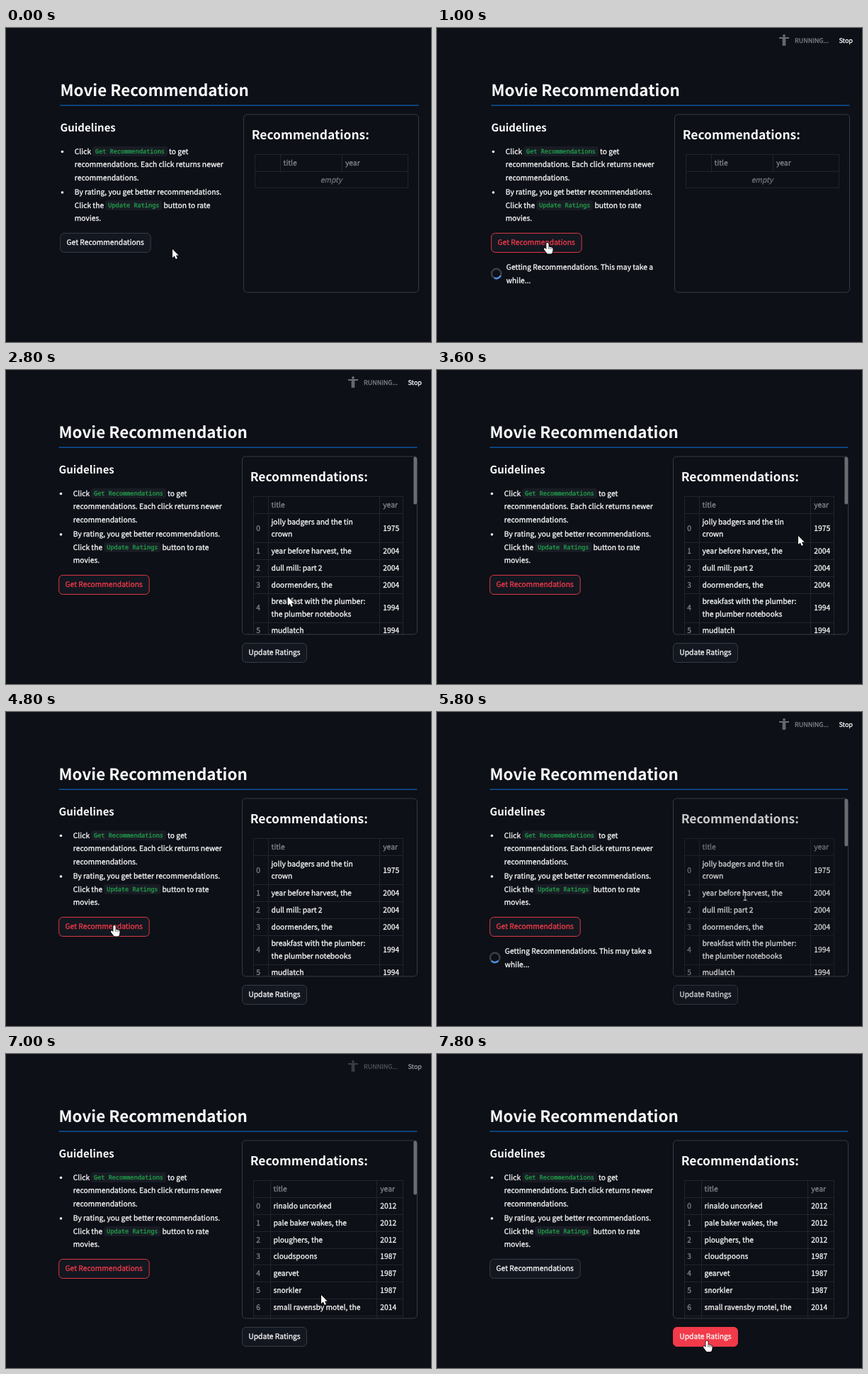
An HTML page with a canvas that plays this animation: 600 by 443 pixels, repeating every 8 s.

```html
<!DOCTYPE html>
<html lang="en">
<head>
<meta charset="utf-8">
<title>Movie Recommendation</title>
<style>
html, body { margin: 0; width: 100%; height: 100%; overflow: hidden; background: #0d1017; }
canvas { display: block; width: 600px; height: 443px; }
</style>
</head>
<body>
<canvas id="stage"></canvas>
<script>
const W = 600, H = 443, LOOP = 8000, STEP = 200;
const SANS = '"Noto Sans CJK JP", "Noto Sans CJK SC", "Noto Sans CJK", "Noto Sans", sans-serif';
const MONO = '"Noto Sans Mono", "DejaVu Sans Mono", monospace';
const BG = '#0d1017', WHITE = '#fafafa', GREY = '#85878d', RED = '#f23a4a';
const EDGE = '#3d4046', RULE = '#21242b', GREEN = '#21a34c', BODY = 10.3;

const canvas = document.getElementById('stage');
const ctx = canvas.getContext('2d');
const dpr = window.devicePixelRatio || 1;
canvas.width = W * dpr;
canvas.height = H * dpr;

// Each run: button press, start of the dimming, status shown, results in, spinner pose.
const runs = [
  { press: 600, dim: 650, on: 1000, done: 2800, spinAt: 2000, spinFrom: 190 },
  { press: 5000, dim: 4800, on: 5200, done: 6800, spinAt: 5800, spinFrom: 90 }
];
const UPDATE_PRESS = 7800;

const pointerPath = [
  [0, 235, 312], [200, 235, 312], [600, 156, 303], [1000, 156, 303], [1800, 398, 320],
  [2800, 398, 320], [3600, 510, 234], [3800, 510, 234], [4600, 158, 302], [4800, 153, 301],
  [5000, 153, 301], [5800, 435, 260], [6200, 435, 260], [7000, 445, 340],
  [7200, 445, 340], [7600, 381, 404.5], [8000, 381, 404.5]
];

const lists = [
  {
    cols: [349, 370, 527, 560],
    thumb: 67,
    rows: [
      [['jolly badgers and the tin', 'crown'], '1975'],
      [['year before harvest, the'], '2004'],
      [['dull mill: part 2'], '2004'],
      [['doormenders, the'], '2004'],
      [['breakfast with the plumber:', 'the plumber notebooks'], '1994'],
      [['mudlatch'], '1994']
    ]
  },
  {
    cols: [349, 373, 523, 560],
    thumb: 76,
    rows: [
      [['rinaldo uncorked'], '2012'],
      [['pale baker wakes, the'], '2012'],
      [['ploughers, the'], '2012'],
      [['cloudspoons'], '1987'],
      [['gearvet'], '1987'],
      [['snorkler'], '1987'],
      [['small ravensby motel, the'], '2014'],
      [[''], '']
    ]
  }
];

const arrow = new Path2D('M0 0V12.2L2.8 9.6L4.8 14L6.9 13L5 8.8H8.7Z');
const hand = new Path2D('M-1.6 1.2Q0 -1.4 1.6 1.2V5.6L6 6.6Q8 7.2 7.7 9.2L7 13.2Q6.6 15.6 4.8 15.6' +
  'H1Q-.6 15.6 -1.5 14L-5 9.2Q-5.4 7.2 -3.5 7.6L-1.6 9.2Z');
const fingers = new Path2D('M1.7 5.6V9M3.9 6.3V9.2M6 6.8V9.4');
const beam = new Path2D('M-2.5 -5.5H2.5M0 -5.5V5.5M-2.5 5.5H2.5');
const poses = [
  'M-1 -2L-2 3L2 5L1 9M-2 3L-5 8M-1 -2L4 0M-1 -2L-5 1',
  'M1 -2L-1 3L3 5L4 9M-1 3L-3 5L-6 8M1 -2L5 2M1 -2L-4 -1L-6 2',
  'M-7 -2.5H7M-1.2 -2V8.5M1.2 -2V8.5'
].map(d => new Path2D(d));

const clamp = v => Math.max(0, Math.min(1, v));

// Regular text gets a hairline outline for a slightly fuller weight.
function text(s, x, mid, o = {}) {
  const size = o.size || BODY, weight = o.weight || 400, y = mid + size * 0.366;
  ctx.font = `${o.style || ''} ${weight} ${size}px ${o.family || SANS}`;
  ctx.textAlign = o.align || 'left';
  ctx.fillStyle = ctx.strokeStyle = o.color || WHITE;
  ctx.fillText(s, x, y);
  if (weight === 400) {
    ctx.lineWidth = 0.3;
    ctx.lineJoin = 'round';
    ctx.strokeText(s, x, y);
  }
}

function rounded(x, y, w, h, r, fill, stroke) {
  ctx.beginPath();
  ctx.roundRect(x, y, w, h, r);
  if (fill) { ctx.fillStyle = fill; ctx.fill(); }
  if (stroke) { ctx.strokeStyle = stroke; ctx.lineWidth = 0.9; ctx.stroke(); }
}

function rule(x, y, w, h) {
  ctx.fillStyle = RULE;
  ctx.fillRect(Math.round(x), Math.round(y), w, h);
}

function button(label, x, y, w, state) {
  const fill = state === 'down' ? RED : '#131720';
  rounded(x + 0.5, y + 0.5, w, 27, 5.5, fill, state ? RED : EDGE);
  text(label, x + 9.3, y + 13.3, { color: state === 'hot' ? RED : WHITE });
}

function code(s, x, mid, w) {
  rounded(x, mid - 7, w, 14, 3, '#191c24');
  text(s, x + 4, mid + 0.3, { size: 8.6, family: MONO, color: GREEN });
}

function bullet(x, y) {
  ctx.beginPath();
  ctx.arc(x, y, 1.8, 0, 7);
  ctx.fillStyle = WHITE;
  ctx.fill();
}

function guide(x) {
  text('Movie Recommendation', x, 88, { size: 22.4, weight: 600 });
  ctx.fillStyle = '#0f58a4';
  ctx.fillRect(x, 108.5, 506, 1.4);
  text('Guidelines', x, 140.5, { size: 15, weight: 600 });
  const tx = x + 20.3;
  bullet(x + 3, 174.5);
  text('Click', tx, 174);
  code('Get Recommendations', x + 45.5, 174, 106);
  text('to get', x + 153.5, 174);
  text('recommendations. Each click returns newer', tx, 192.4);
  text('recommendations.', tx, 210.8);
  bullet(x + 3, 232);
  text('By rating, you get better recommendations.', tx, 231.5);
  text('Click the', tx, 250);
  code('Update Ratings', x + 63.8, 250, 80);
  text('button to rate', x + 146, 250);
  text('movies.', tx, 268.4);
}

function emptyTable() {
  for (const y of [178, 202, 225]) rule(351, y, 217, 1);
  rule(351, 178, 1, 48);
  rule(567, 178, 1, 48);
  rule(387, 178, 1, 24);
  rule(474, 178, 1, 24);
  text('title', 391.5, 190.5, { color: GREY });
  text('year', 479, 190.5, { color: GREY });
  text('empty', 459, 214, { color: '#70727a', style: 'italic', align: 'center' });
}

function table({ cols, rows }) {
  const [a, b, c, d] = cols;
  rule(a, 178, d - a, 1);
  for (const x of cols) rule(x, 178, 1, 196);
  text('title', b + 4.5, 190.5, { color: GREY });
  text('year', c + 5.3, 190.5, { color: GREY });
  let y = 202.4;
  rows.forEach(([lines, year], i) => {
    const h = lines.length > 1 ? 41 : 23.75, mid = y + h / 2;
    rule(a, y, d - a, 1);
    text(i, a + 4.3, mid, { color: GREY });
    lines.forEach((s, k) => text(s, b + 4.5, mid + (k - (lines.length - 1) / 2) * 17.4));
    text(year, c + 5.3, mid);
    y += h;
  });
}

function spinner(x, y, degrees) {
  const mid = degrees * Math.PI / 180;
  ctx.lineWidth = 2.4;
  ctx.beginPath();
  ctx.arc(x, y, 6.7, 0, 2 * Math.PI);
  ctx.strokeStyle = '#3c3f46';
  ctx.stroke();
  ctx.beginPath();
  ctx.arc(x, y, 6.7, mid - 0.8, mid + 0.8);
  ctx.strokeStyle = '#4a94e8';
  ctx.stroke();
}

function status(t, alpha) {
  const pose = t / STEP % 3;
  ctx.save();
  ctx.globalAlpha = alpha;
  text('RUNNING...', 505, 17.5, { size: 9, color: '#7f8288' });
  text('Stop', 567.5, 17.5, { size: 9 });
  ctx.translate(490, 16.5);
  ctx.strokeStyle = ctx.fillStyle = '#6c6e73';
  ctx.lineWidth = 2.2;
  ctx.stroke(poses[pose]);
  ctx.beginPath();
  ctx.arc(pose === 1 ? 2 : 0, -5.6, 1.9, 0, 7);
  ctx.fill();
  ctx.restore();
}

function pointerAt(t) {
  const i = pointerPath.findIndex((p, k) => k > 0 && t <= p[0]);
  const [t0, x0, y0] = pointerPath[i - 1], [t1, x1, y1] = pointerPath[i];
  const p = (t - t0) / (t1 - t0), e = p * p * (3 - 2 * p);
  return { x: x0 + (x1 - x0) * e, y: y0 + (y1 - y0) * e };
}

function drawPointer({ x, y }, kind) {
  ctx.save();
  ctx.translate(x, y);
  ctx.lineJoin = 'round';
  if (kind === 'beam') {
    ctx.strokeStyle = '#c8c8c8';
    ctx.lineWidth = 1;
    ctx.stroke(beam);
  } else {
    const shape = kind === 'hand' ? hand : arrow;
    ctx.fillStyle = '#fff';
    ctx.strokeStyle = '#000';
    ctx.lineWidth = 1.4;
    ctx.stroke(shape);
    ctx.fill(shape);
    if (kind === 'hand') {
      ctx.lineWidth = 0.6;
      ctx.stroke(fingers);
    }
  }
  ctx.restore();
}

function draw(t) {
  ctx.setTransform(dpr, 0, 0, dpr, 0, 0);
  ctx.textRendering = 'geometricPrecision';
  ctx.fillStyle = BG;
  ctx.fillRect(0, 0, W, H);

  const shown = runs.filter(r => t >= r.done).length;
  const list = lists[shown - 1];
  const left = list ? 74.5 : 76.5, box = list ? 333 : 335;
  const active = runs.find(r => t >= r.on && t < r.done + 2 * STEP);
  const busy = active && t < active.done;
  const dimming = runs.find(r => t >= r.dim && t < r.done);
  const fade = dimming ? 1 - 0.67 * clamp((t - dimming.dim - 500) / 1000) ** 1.7 : 1;

  const p = pointerAt(t);
  const within = (x, y, w, h) => p.x >= x && p.x <= x + w && p.y >= y && p.y <= y + h;
  const overGet = within(left, 289, 128, 28);
  const overUpdate = list && within(box, 385, 92, 28);
  const inBox = within(box, 122, 247, 251);
  const overText = shown === 1 && within(375, 249, 113, 14);

  guide(left);

  const pressed = runs.some(r => t >= r.press && t < r.press + STEP);
  const focused = t >= runs[0].press && t < UPDATE_PRESS;
  button('Get Recommendations', left - 0.3, 289, 127.5, pressed ? 'down' : overGet || focused ? 'hot' : '');

  if (busy) {
    spinner(left + 7.3, 346.5, active.spinFrom + (t - active.spinAt) / 750 * 360);
    text('Getting Recommendations. This may take a', left + 21.3, 337.5);
    text('while...', left + 21.3, 356);
  }

  ctx.save();
  ctx.beginPath();
  ctx.roundRect(box, 121.5, 248, 251.5, 5);
  ctx.clip();
  ctx.globalAlpha = fade;
  text('Recommendations:', box + 11.7, 151, { size: 17.4, weight: 600 });
  if (list) table(list);
  else emptyTable();
  ctx.restore();
  rounded(box + 0.5, 122, 247, 251, 5, null, EDGE);
  if (list && inBox) rounded(box + 242.4, 122.5, 4.6, list.thumb, 2, '#6b6c70');

  if (list) {
    ctx.globalAlpha = fade;
    button('Update Ratings', box, 385, 91, t >= UPDATE_PRESS ? 'down' : overUpdate ? 'hot' : '');
    ctx.globalAlpha = 1;
  }

  if (active) status(t, busy || t === active.done ? 1 : 0.5);
  drawPointer(p, overGet || overUpdate ? 'hand' : overText ? 'beam' : 'arrow');
}

function tick(now) {
  draw(Math.floor(now % LOOP / STEP) * STEP);
  requestAnimationFrame(tick);
}
draw(0);
requestAnimationFrame(tick);
</script>
</body>
</html>
```
